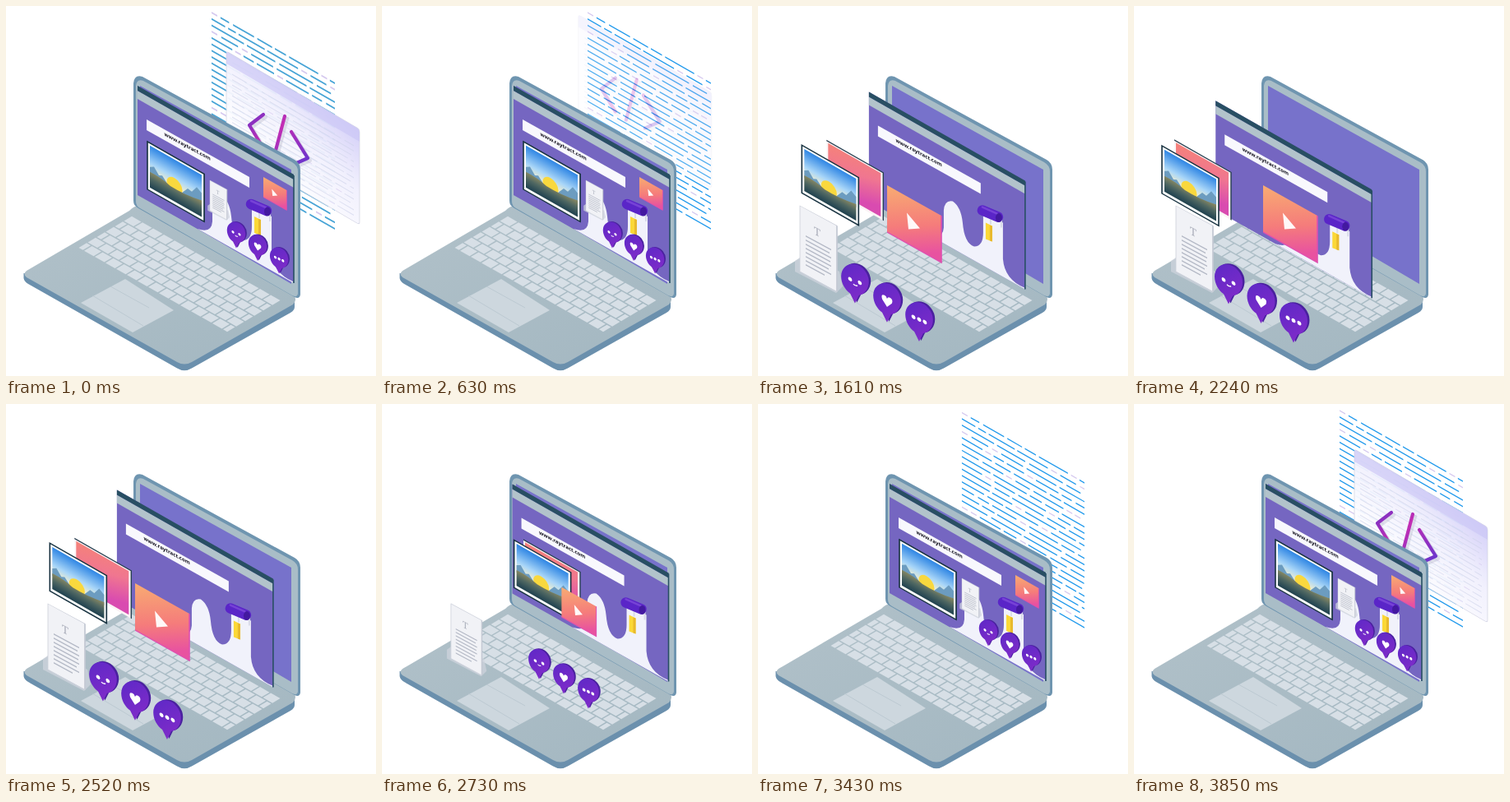
An HTML page that plays this animation: 450 by 450 pixels, repeating every 4.2 s.

```html
<!DOCTYPE html>
<html lang="en">
<head>
<meta charset="utf-8">
<title>Layered laptop</title>
<style>
html, body { margin: 0; width: 100%; height: 100%; overflow: hidden; background: #fff; }
svg { display: block; width: 100vw; height: 100vh; }
.url { font: 700 6.1px "Open Sans", "Noto Sans", sans-serif; fill: #14121f; }
.tee { font: 13px "Noto Serif", serif; fill: #a9adba; }
</style>
</head>
<body>
<svg viewBox="0 0 450 450">
  <defs>
    <linearGradient id="sky" x2="0" y2="1">
      <stop stop-color="#2f86e4"/><stop offset=".42" stop-color="#a9d6f8"/><stop offset=".66" stop-color="#f6f0cc"/>
    </linearGradient>
    <linearGradient id="land" x2="0" y2="1">
      <stop stop-color="#8b8a62"/><stop offset=".45" stop-color="#4f6762"/><stop offset="1" stop-color="#1f4150"/>
    </linearGradient>
    <linearGradient id="warm" x2=".7" y2="1">
      <stop stop-color="#f8ac72"/><stop offset=".6" stop-color="#f57c7b"/><stop offset="1" stop-color="#e852a0"/>
    </linearGradient>
    <linearGradient id="rose" x2=".4" y2="1">
      <stop stop-color="#f58279"/><stop offset=".5" stop-color="#f07690"/><stop offset="1" stop-color="#d94bb0"/>
    </linearGradient>
    <linearGradient id="pinFill" gradientUnits="userSpaceOnUse" x1="-10" y1="-30" x2="85" y2="85">
      <stop stop-color="#5a28c6"/><stop offset=".5" stop-color="#8f2dca"/><stop offset="1" stop-color="#d83cc0"/>
    </linearGradient>
    <linearGradient id="sheetFill" x1="1" x2=".4" y2=".9">
      <stop stop-color="#d2cdf8"/><stop offset=".5" stop-color="#f1f0fd"/><stop offset="1" stop-color="#fcfcff"/>
    </linearGradient>
    <linearGradient id="mark" gradientUnits="userSpaceOnUse" x1="300" y1="131" x2="355" y2="195">
      <stop stop-color="#7a32c4"/><stop offset=".4" stop-color="#c42db4"/><stop offset="1" stop-color="#7034cb"/>
    </linearGradient>
    <linearGradient id="deck" x2="1" y2="1">
      <stop stop-color="#b1c1c9"/><stop offset="1" stop-color="#a3b7c1"/>
    </linearGradient>
  </defs>

  <g id="lines"></g>

  <g id="sheet">
    <g transform="matrix(1 .586 0 1 268 55)">
      <rect width="162" height="116" rx="3" fill="url(#sheetFill)" stroke="#d3d4e4" stroke-width=".8" opacity=".95"/>
      <path d="M3 0H159Q162 0 162 3V15H0V3Q0 0 3 0Z" fill="#cbc7f6" opacity=".65"/>
      <g id="sheetRows" stroke="#cfd3ea" stroke-width="1.1" opacity=".65"></g>
    </g>
    <g fill="none" stroke-width="4.2" stroke-linecap="round" stroke-linejoin="round">
      <path d="M316 135L299 148L316 176M342 137L329 186M350 156L370 188L352 196" stroke="#a5a5b8" opacity=".3"/>
      <path d="M313 132L296 145L313 173M339 134L326 183M347 153L367 185L349 193" stroke="url(#mark)"/>
    </g>
  </g>

  <g id="laptop">
    <path d="M21.5 325V331Q22 335 27 338L208 440.500Q217 446 226 440.500L346 373Q351 370 351 366V357Z" fill="#6b90ad"/>
    <path d="M25 322L150 249Q156 242 164 243L349 349Q355 357 349 363L226 433Q217 438 208 433L25 330Q20 326 25 322Z" fill="url(#deck)"/>
    <path d="M145 332L204 370L154 397L91 361Z" fill="#cdd7de"/>
    <path d="M105 352L167 389M127 341L174 367" stroke="#b8c6cf" stroke-width=".8"/>
    <g id="keys" fill="#d7dfe6"></g>
    <path d="M155 94Q156 83 166 86L351 187Q358 191 358 199V351Q357 357 351 354L161 246Q155 243 155 237Z" fill="#6f95b0"/>
    <path d="M158 97Q159 88 167 91L348 190Q355 194 355 201V350Q354 355 348 352L163 246Q158 243 158 238Z" fill="#a9bdc7"/>
    <path d="M163 97L347 199V338L163 230Z" fill="#7772cb"/>
  </g>

  <g id="win">
    <path d="M160 97L350 205V337L160 230Z" fill="#7566c1"/>
    <path d="M160 103L350 211V221L160 113Z" fill="#b2c3cb"/>
    <path d="M160 97L350 205V211L160 103Z" fill="#284f63"/>
    <path d="M350 206V337" stroke="#284f63" stroke-width="1.6"/>
    <path d="M171 138L296 208V221L171 151Z" fill="#f8f8fd"/>
    <text class="url" transform="matrix(1 .54 0 1 192.500 157.500)">www.raytract.com</text>
    <path d="M233 271Q250 277 251 262V241Q252 228 262 230Q272 237 274 256Q276 281 288 285Q299 285 299 268V246L323 256V300Q325 325 349 335V336.500Z" fill="#f1f2fb"/>
    <path d="M308 247V258M321 249V262" stroke="#d9dbe9" stroke-width="2"/>
    <path d="M302 256L310 260V279L302 276Z" fill="#fbd837"/>
    <path d="M307 259L310 260V279L307 278Z" fill="#e8b92e"/>
    <path d="M298 241L317 249" stroke="#5a25c8" stroke-width="12.500" stroke-linecap="round"/>
    <path d="M298 237L316 245" stroke="#7642d6" stroke-width="2.500" stroke-linecap="round"/>
    <ellipse cx="318" cy="250" rx="4" ry="5.500" fill="#4319a0"/>
  </g>

  <g id="doc">
    <path d="M-6 67L7 58L48 80L52 98L44 106L-6 80Z" fill="#ced3dc" opacity=".75"/>
    <g transform="matrix(1 .54 0 1 0 0)">
      <rect width="45" height="80" fill="#f1f2f6" stroke="#ccd0da" stroke-width=".8"/>
      <path d="M45 0V80" stroke="#c3c8d3" stroke-width="1.6"/>
      <text class="tee" x="17" y="25">T</text>
      <path d="M7 33H38M7 38H36M7 43H38M7 48H37M7 53H38M7 58H35M7 63H38M7 68H30" stroke="#b3b8c5" stroke-width="1.5"/>
    </g>
  </g>

  <g id="card">
    <g transform="matrix(1 .57 0 1 0 0)">
      <path d="M0 0H69V58H0Z" fill="#fbf3f5"/>
      <path d="M2 2H66V55H2Z" fill="url(#rose)"/>
      <path d="M0 0H69V58" fill="none" stroke="#263f50" stroke-width="1.4"/>
    </g>
  </g>

  <g id="photo">
    <g transform="matrix(1 .57 0 1 0 0)">
      <path d="M0 0H69V58H0Z" fill="#f8fbfc"/>
      <path d="M3 3H66V54H3Z" fill="url(#sky)"/>
      <path d="M3 29L8 26L14 33L18 31L25 38H3ZM66 25L60 21L54 30L49 29L42 38H66Z" fill="#6c9cc0"/>
      <circle cx="33" cy="35" r="9.500" fill="#f9d83e"/>
      <path d="M3 35Q17 34 28 38Q45 39 66 34V54H3Z" fill="url(#land)"/>
      <path d="M0 58V0H69V58Z" fill="none" stroke="#17313f" stroke-width="1.6"/>
    </g>
  </g>

  <g id="video">
    <g transform="matrix(1 .56 0 1 0 0)">
      <path d="M0 0H66V57H0Z" fill="url(#warm)"/>
      <path d="M0 57H66V0" fill="none" stroke="#df4fb0" stroke-width="1.6"/>
      <path d="M24 20L40 30L26 39Z" fill="#fff8f8"/>
    </g>
  </g>

  <g id="pins"></g>
</svg>

<script>
const $ = id => document.getElementById(id);
const clamp = (v, lo, hi) => Math.min(hi, Math.max(lo, v));
const mix = (a, b, p) => a + (b - a) * p;
const progress = (k, start, end) => clamp((k - start) / (end - start), 0, 1);
const smooth = t => t * t * (3 - 2 * t);
const LOOP = 4200, STEP = 70;

let seed = 11;
const rand = () => (seed = seed * 16807 % 2147483647) / 2147483647;

// Rows of broken text strokes
function dashRows(width, top, bottom, pitch) {
  let out = "";
  for (let y = top; y < bottom; y += pitch) {
    for (let x = 0; x < width - 3;) {
      const pale = rand() < .12;
      const end = Math.min(width, x + (pale ? 7 : 9 + rand() * 32));
      out += `<path d="M${x.toFixed(1)} ${y.toFixed(1)}H${end.toFixed(1)}"${pale ? ' stroke="#d5c9ef"' : ""}/>`;
      x = end + 3 + rand() * 2;
    }
  }
  return out;
}
$("lines").innerHTML = `<g transform="matrix(1 .573 0 1 250 6)">${dashRows(150, 2, 184, 7.7)}</g>`;
$("sheetRows").innerHTML = `<g transform="translate(7 0)">${dashRows(148, 24, 112, 6.5)}</g>`;

// Keyboard: u runs along a row, v runs towards the front
const deckPoint = (u, v) => `${(153 + 182 * u - 66 * v).toFixed(1)} ${(255 + 103 * u + 39 * v).toFixed(1)}`;
function keyboard(rows, cols) {
  const gapU = .004, gapV = .011;
  let out = "";
  for (let r = 0; r < rows; r++) {
    const v0 = r / rows + gapV, v1 = (r + 1) / rows - gapV;
    for (let c = r % 2 ? -.5 : 0; c < cols; c++) {
      const u0 = Math.max(0, c / cols) + gapU, u1 = Math.min(1, (c + 1) / cols) - gapU;
      out += `<path d="M${deckPoint(u0, v0)}L${deckPoint(u1, v0)}L${deckPoint(u1, v1)}L${deckPoint(u0, v1)}Z"/>`;
    }
  }
  return out;
}
$("keys").innerHTML = keyboard(6, 14);

const icons = [
  '<circle cx="-6" r="2.4"/><circle cx="6" cy="-1" r="2.4"/><path d="M-2 4Q0 6 3 4" fill="none" stroke="#fff" stroke-width="1.5"/>',
  '<path d="M0 8L-6 1Q-8 -5 -3 -5Q-1 -5 0 -2Q1 -5 3 -5Q8 -5 6 1Z"/>',
  '<circle cx="-7" r="2.5"/><circle r="2.5"/><circle cx="7" r="2.5"/>'
];
const pinShape = "M-17 -2A17 18 0 0 1 17 -2C17 8 11 15 5 17L0 28L-6 17C-12 14 -17 7 -17 -2Z";
$("pins").innerHTML = icons.map((icon, i) => {
  const x = 39.5 * i, y = 23.5 * i;
  const body = (dx, dy, fill) => `<g fill="${fill}" transform="translate(${dx} ${dy})">
    <path transform="translate(${x} ${y}) matrix(1 .2 0 1 0 0)" d="${pinShape}"/></g>`;
  return body(2.5, -1, "#4a219f") +
    `<path d="${pinShape}" transform="matrix(1 .2 0 1 ${x} ${y})" fill="url(#pinFill)"/>` +
    `<g transform="matrix(1 .45 0 1 ${x} ${y + 1})" fill="#fff">${icon}</g>`;
}).join("");

// Parts that leave the screen: position from/to, active steps, size at rest, sag of the path
const parts = {
  win:   { from: [0, 0],     to: [-63, 19],    span: [3.2, 12] },
  card:  { from: [172, 165], to: [49, 163],    span: [4, 8.6] },
  photo: { from: [172, 165], to: [34, 170],    span: [3.1, 8.2] },
  doc:   { from: [248, 212], to: [51, 243],    span: [0, 5.4], size: .46, sag: 9 },
  video: { from: [313, 208], to: [157, 218],   span: [0, 7],   size: .43, sag: 9 },
  pins:  { from: [280, 276], to: [115, 334.5], span: [0, 7.6], size: .66, sag: 6 }
};

function movePart(id, k) {
  const { from, to, span, size = 1, sag = 0 } = parts[id];
  const p = smooth(progress(k, ...span));
  const x = mix(from[0], to[0], p), y = mix(from[1], to[1], p) + sag * 4 * p * (1 - p);
  $(id).setAttribute("transform", `translate(${x} ${y}) scale(${mix(size, 1, p * p)})`);
}

// Layers behind the lid slide out and settle
function moveLayer(id, t, dx, dy, shrink, opacity) {
  const q = (1 - t) ** 2;
  $(id).setAttribute("transform", `translate(${250 + dx * q} ${6 + dy * q}) scale(${1 - shrink * q}) translate(-250 -6)`);
  $(id).setAttribute("opacity", opacity);
}

function render(now) {
  const n = Math.floor(now % LOOP / STEP);
  const ramp = (start, steps) => clamp(n - start, 0, steps);
  const back = 11 - ramp(4, 11) + ramp(44, 11);
  const front = ramp(16, 12) - ramp(31, 12);

  for (const id in parts) movePart(id, front);
  const sheet = progress(back, 5, 11);
  moveLayer("lines", progress(back, 0, 6), -75, 88, .2, back > 0 ? 1 : 0);
  moveLayer("sheet", sheet, -42, -64, 0, Math.min(1, sheet * 1.6));

  const bold = n < 5;
  $("lines").setAttribute("stroke", bold ? "#45a3d6" : "#1d98ec");
  $("lines").setAttribute("stroke-width", bold ? 2 : 1.5);
}

function tick() {
  render(performance.now());
  requestAnimationFrame(tick);
}
tick();
</script>
</body>
</html>
```
